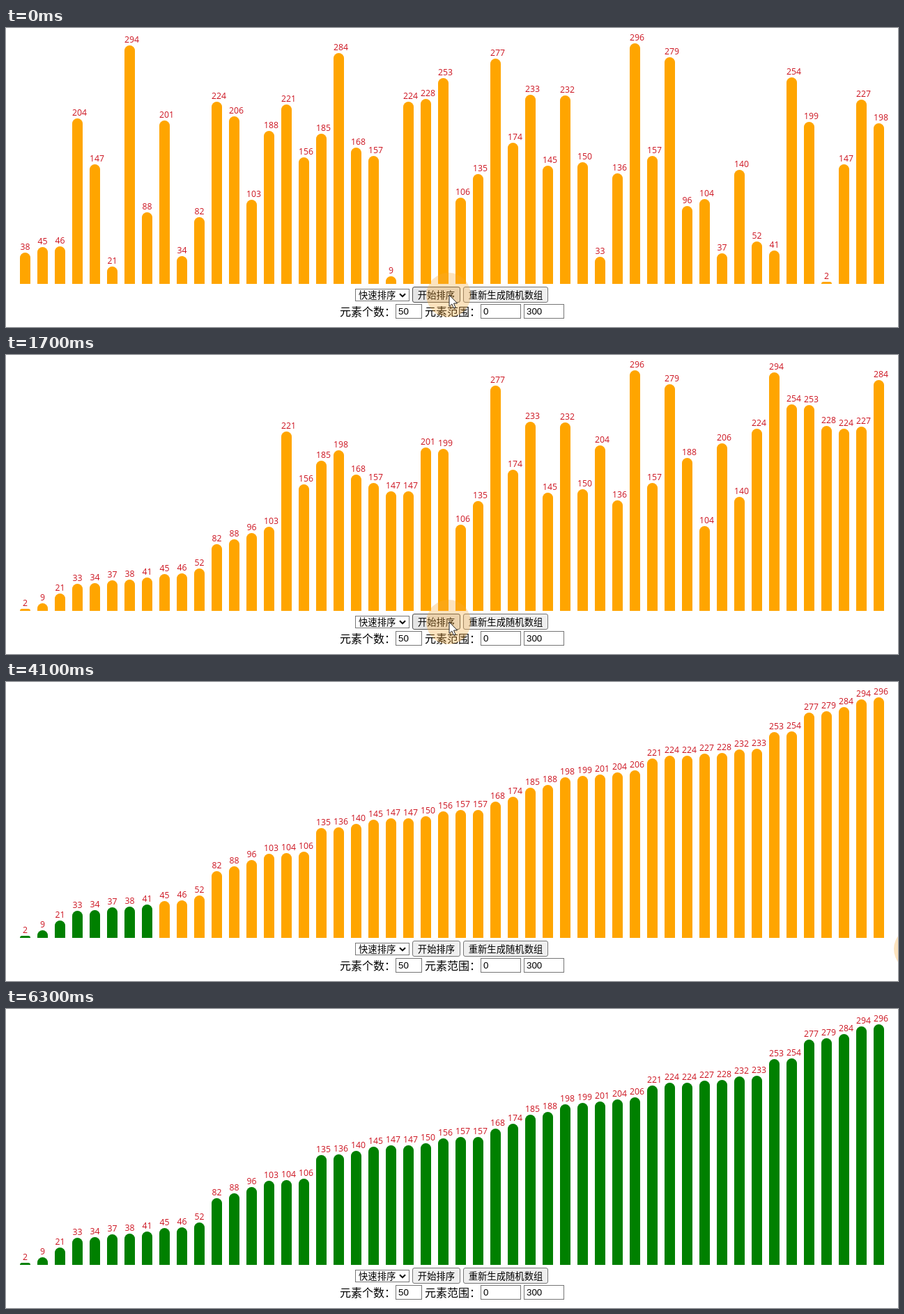
An HTML page for the animation above (6400 ms loop, 1280 px wide and 430 px high).

```html
<!DOCTYPE html>
<html lang="zh">
<head>
<meta charset="utf-8">
<style>
  html, body { margin: 0; width: 100%; height: 100%; overflow: hidden; background: #fff; }
  #stage { position: relative; width: 1280px; height: 430px; overflow: hidden; color: #000;
    font: 13.333px "Noto Sans CJK SC", "Noto Sans CJK", sans-serif; }
  #stage * { position: absolute; box-sizing: border-box; white-space: nowrap; }
  .bar { width: 15px; bottom: 62.5px; border-radius: 7.5px 7.5px 0 0; }
  .bar span { left: 0; bottom: 100%; width: 15px; text-align: center; color: #cc1420;
    font: 12.25px/16px "Open Sans", "Noto Sans", sans-serif; }
  .select, .button, .input { border: 1px solid #767676; }
  .select { left: 501px; top: 375px; width: 78px; height: 18px; line-height: 16px; padding-left: 4px; }
  .button { top: 372px; height: 23px; line-height: 21px; text-align: center;
    background: #efefef; border-radius: 3px; }
  .button.hover { background: #e5e5e5; border-color: #4f4f4f; }
  .label { top: 396px; font-size: 16px; line-height: 22px; }
  .input { top: 397px; height: 21px; padding-left: 3px; line-height: 19px;
    font-family: "Liberation Sans", Arial, sans-serif; }
  #pointer { left: 0; top: 0; overflow: visible; }
</style>
</head>
<body>
<div id="stage">
  <div class="select">快速排序
    <svg style="left:62px;top:5px" width="10" height="7"><path d="M1 1.2 5 5.2 9 1.2" fill="none" stroke="#000" stroke-width="2"/></svg>
  </div>
  <div class="button" id="start" style="left:583px;width:69px">开始排序</div>
  <div class="button" style="left:656px;width:122px">重新生成随机数组</div>
  <div class="label" style="left:479px">元素个数：</div>
  <div class="input" style="left:559px;width:38px">50</div>
  <div class="label" style="left:601px">元素范围：</div>
  <div class="input" style="left:681px;width:58px">0</div>
  <div class="input" style="left:743px;width:58px">300</div>
</div>
<script>
const LOOP = 6400, SORT_START = 556, STEP = 47.7;
const values = [38, 45, 46, 204, 147, 21, 294, 88, 201, 34, 82, 224, 206, 103, 188, 221, 156,
  185, 284, 168, 157, 9, 224, 228, 253, 106, 135, 277, 174, 233, 145, 232, 150, 33, 136, 296,
  157, 279, 96, 104, 37, 140, 52, 41, 254, 199, 2, 147, 227, 198];

// Every swap, including a pivot staying in place, is one visible step.
const steps = [values.slice()];
function swap(i, j) {
  [values[i], values[j]] = [values[j], values[i]];
  steps.push(values.slice());
}
function quickSort(lo, hi) {
  if (lo >= hi) return;
  const pivot = values[lo];
  let i = lo, j = hi;
  while (i < j) {
    while (i < j && values[j] >= pivot) j--;
    while (i < j && values[i] <= pivot) i++;
    if (i < j) swap(i, j);
  }
  swap(lo, i);
  quickSort(lo, i - 1);
  quickSort(i + 1, hi);
}
quickSort(0, values.length - 1);

// Number of confirmed bars over time: [ms, count]
const confirmed = [[3705, 0], [4800, 22.7], [5700, 39.4], [5900, 41.4], [6000, 41.4], [6300, 50.5]];
function interpolate(keys, t) {
  if (t <= keys[0][0]) return keys[0][1];
  for (let k = 1; k < keys.length; k++) {
    const [t0, a] = keys[k - 1], [t1, b] = keys[k];
    if (t <= t1) return a + (b - a) * (t - t0) / (t1 - t0);
  }
  return keys[keys.length - 1][1];
}

const stage = document.getElementById('stage');
const start = document.getElementById('start');
const bars = values.map((_, i) => {
  const bar = document.createElement('div');
  bar.className = 'bar';
  bar.style.left = 20 + 25 * i + 'px';
  const label = bar.appendChild(document.createElement('span'));
  stage.append(bar);
  return { bar, label };
});
stage.insertAdjacentHTML('beforeend', `
  <svg id="pointer" width="1" height="1">
    <circle r="32" fill="#f5aa3c" fill-opacity=".33"/>
    <path d="M1 0V16.5L4.8 13 7.4 19 10 17.9 7.5 12H12.6Z" fill="#fff" stroke="#222" stroke-width="1"/>
  </svg>`);
const pointer = document.getElementById('pointer');

function draw(t) {
  const step = Math.floor((t - SORT_START) / STEP);
  const order = steps[Math.max(0, Math.min(steps.length - 1, step))];
  const done = Math.floor(interpolate(confirmed, t));
  bars.forEach(({ bar, label }, i) => {
    bar.style.height = order[i] * 7 / 6 + 'px';
    bar.style.background = i < done ? '#008000' : '#ffa500';
    label.textContent = order[i];
  });

  // The pointer rests on the button, then leaves to the right.
  const p = Math.max(0, Math.min(1, (t - 3750) / 400));
  const x = 635 + 700 * p * p * (3 - 2 * p);
  pointer.style.transform = `translate(${x}px, 384px)`;
  start.classList.toggle('hover', x < 652);
}

const origin = performance.now();
function tick() {
  draw((performance.now() - origin) % LOOP);
  requestAnimationFrame(tick);
}
tick();
</script>
</body>
</html>
```
